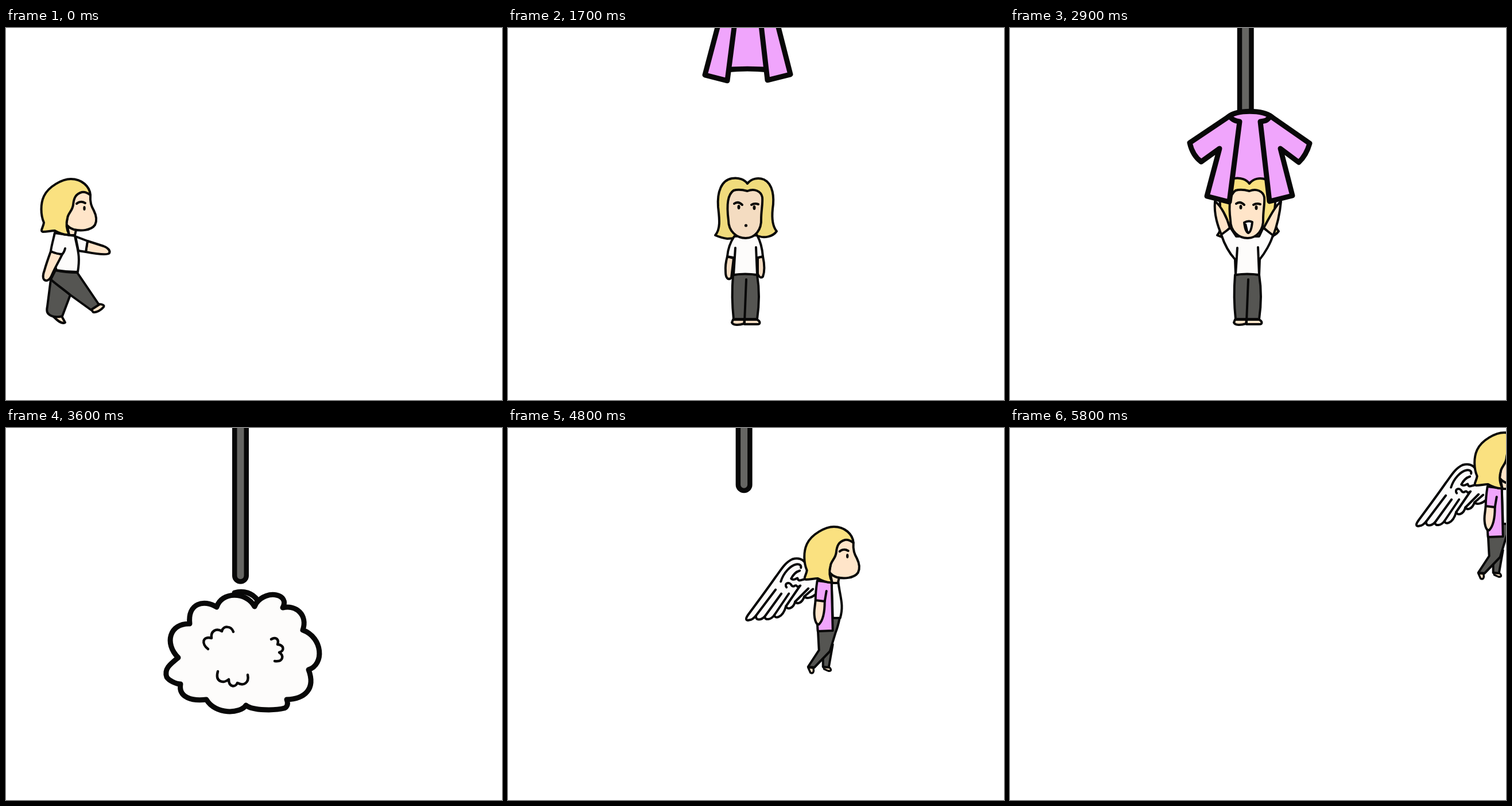
Recreate the animation shown at these times as an HTML page with a canvas. Size 864 px wide and 648 px high, loop 5900 ms.

```html
<!DOCTYPE html>
<html lang="en">
<head>
<meta charset="utf-8">
<title>New coat</title>
<style>
html, body { margin: 0; height: 100%; overflow: hidden; background: #fff; }
canvas { display: block; }
</style>
</head>
<body>
<canvas id="stage" width="864" height="648"></canvas>
<script>
const ctx = document.getElementById('stage').getContext('2d');
const INK = '#080808', WHITE = '#fdfcfb', PANTS = '#555552', PINK = '#f0a5fc';
let skin, hair;

function draw(d, fill, width = 4) {
  const path = new Path2D(d);
  if (fill) { ctx.fillStyle = fill; ctx.fill(path); }
  if (width) { ctx.lineWidth = width; ctx.stroke(path); }
}

function dot(x, y, rx, ry) {
  ctx.fillStyle = INK;
  ctx.beginPath();
  ctx.ellipse(x, y, rx, ry, 0, 0, 7);
  ctx.fill();
}

function at(x, y, part) {
  ctx.save();
  ctx.translate(x, y);
  part();
  ctx.restore();
}

function tone(dim) {
  skin = dim ? '#f4dcc1' : '#ffe5c9';
  hair = dim ? '#f0db7c' : '#fae180';
}

// Straight line through [time, value] pairs
function track(t, keys) {
  for (let i = 1; i < keys.length; i++) {
    const [a, u] = keys[i - 1], [b, v] = keys[i];
    if (t <= b) return u + (v - u) * (t - a) / (b - a);
  }
  return keys[keys.length - 1][1];
}

function sideHead() {
  draw('M107 346L122 352L120 361L110 361Z', skin);
  draw('M147 291C146 304 149 311 153 318C158 328 158 337 155 343C148 353 130 354 118 351C112 349 108 346 105 342L112 300L132 280', skin);
  draw('M64 355C59 353 65 347 66 339C60 325 60 306 66 293C74 276 98 263 113 263C132 263 146 276 147 291C142 287 138 285 132 286C121 289 118 297 117 308C116 318 108 323 107 331C104 342 106 352 110 360C100 361 92 357 85 353C78 353 72 355 64 355Z', hair);
  draw('M123 306C127 302 133 302 138 305');
  dot(136.5, 314, 2.2, 4);
}

function stride(armForward) {
  draw('M83 503L97 502L103 513C98 516 92 512 83 503Z', skin);
  draw('M148 490L162 481C168 481 172 483 170 486C166 491 158 496 152 495Z', skin);
  draw('M78 438L112 465L98 502C90 504 82 503 78 501C72 498 70 494 72 485Z', PANTS);
  draw('M86 422C100 425 112 426 124 426L162 482L148 491L112 465C100 455 88 447 78 438Z', PANTS);
  if (!armForward) {
    draw('M142 371L170 380C178 383 182 388 180 392C177 396 160 394 139 390Z', skin);
    draw('M121 363L142 371L139 390L126 388Z', WHITE);
  }
  draw('M85 357L112 361L120 362C124 385 130 395 125 425C112 425 100 424 88 422C84 410 80 400 80 389Z', WHITE);
  if (armForward) {
    draw('M126 377L180 383C192 385 196 390 192 394C180 399 150 398 122 394Z', skin);
    draw('M93 372C105 370 118 373 128 377L122 394C112 394 102 394 96 392', WHITE);
  } else {
    draw('M78 389C85 392 93 394 98 394C93 405 85 418 80 430C76 440 70 442 66 438C64 435 64 430 67 422C70 411 74 400 78 389Z', skin);
    draw('M85 357C82 370 79 380 78 389C85 392 93 394 98 394C101 391 102 388 103 384', WHITE);
  }
  sideHead();
}

function sideArm() {
  draw('M81 391L97 393C97 408 95 425 87 433C81 435 78 420 79 408Z', skin);
}

function stand() {
  draw('M86 508L102 506C108 508 107 515 102 516C95 517 90 517 86 514Z', skin);
  draw('M92 426L124 426C118 455 110 482 102 507L86 507L85 430Z', PANTS);
  draw('M84 357L120 360C122 385 132 395 123 426Q108 427 92 426L81 391C81 380 82 370 84 357Z', WHITE);
  sideArm();
  draw('M100 375L97 394');
  sideHead();
}

function wing() {
  draw('M538 288C530 296 520 299 516 294C512 306 503 308 500 303C497 315 486 318 484 311C478 333 463 333 464 326C458 335 447 336 447 329C440 336 430 336 432 327C428 332 424 335 420 335C414 337 413 333 418 326C432 307 450 283 466 260C475 248 482 235 495 229C505 226 515 228 520 240', WHITE);
  draw('M466 282L432 327M476 289L447 329M489 289L464 326M508 276L484 311M523 280L500 303M531 281L516 294', null);
  draw('M475 268C480 252 492 240 502 238C508 237 511 240 510 244M508 249C501 251 496 257 493 263C498 267 502 262 504 262C506 269 510 265 516 264', null);
  draw('M485 278C480 271 490 267 494 275C497 279 500 273 502 275C504 278 507 277 509 275', null);
}

function angel(flap) {
  at(70.5, 355.5, () => {
    ctx.rotate(flap);
    at(-525, -265, wing);
  });
  draw('M95 508L104 507C110 512 108 515 103 514L96 511Z', skin, 3.5);
  draw('M68 508L77 509C79 516 76 520 72 517Z', skin, 3.5);
  draw('M111 468L104 508L94 507L94 490Z', PANTS);
  draw('M85 440L111 422L123 422C121 432 118 442 116 447L106 480L79 508L68 507L87 478Z', PANTS);
  draw('M109 360L120 354C123 385 131 397 124 422L111 422Z', WHITE);
  draw('M84 357L109 360L111 444L85 445L81 390C81 380 82 370 84 357Z', PINK);
  sideArm();
  draw('M100 375L97 393');
  sideHead();
}

function front(cheer, dressed) {
  draw('M361 361C371 350 368 330 366 312C364 285 372 265 390 262C402 260 412 264 417 271C424 262 436 260 446 264C462 272 464 295 461 315C459 335 462 347 468 354C461 364 446 366 438 363L382 367C374 366 368 364 361 361Z', hair);
  draw('M392 508L412 508L411 515C402 518 392 518 390 513Z', skin);
  draw('M412 508L434 508C440 511 440 516 434 516L412 516Z', skin);
  draw('M393 430C405 427 422 428 434 430C438 455 438 480 434 507L393 507C390 480 390 455 392 430Z', PANTS);
  draw('M415 438L412 512');
  if (cheer) {
    draw('M357 302C355 325 362 345 369 362L383 348C378 330 368 310 357 302Z', skin);
    draw('M472 302C470 325 465 345 458 363L442 348C452 330 462 310 472 302Z', skin);
    draw('M392 403C380 390 372 372 368 360L384 348L394 363H434L441 348L458 361C454 375 444 392 435 403L434 430Q413 427 393 430Z', WHITE);
  } else {
    draw('M382 398L393 401L389 435C384 440 379 436 379 425C378 412 380 405 382 398Z', skin);
    draw('M435 400L444 398C447 412 447 425 444 433C440 437 436 432 435 428Z', skin);
    draw('M394 363C388 372 383 385 382 398L393 400V430Q413 427 434 430L435 400L444 398C443 385 440 372 434 361Z', WHITE);
  }
  draw('M396 383L393 430M432 382L434 430');
  if (dressed) {
    draw('M394 363C388 372 383 385 382 398L393 400L390 450L406 452L404 364Z', PINK);
    draw('M434 361C440 372 443 385 444 398L435 400L438 450L422 452L424 364Z', PINK);
  }
  draw('M384 335C381 312 382 290 393 283C402 280 410 282 417 284C429 279 441 284 443 295C444 306 441 318 441 332C442 352 430 366 414 366C398 366 384 354 384 335Z', skin);
  draw('M394 306C398 303 403 303 408 308M424 308C429 305 433 306 436 307');
  dot(402, 312, 2.5, 4);
  dot(429, 313, 2.5, 4);
  if (cheer || dressed) {
    draw('M408 339C413 336 418 336 422 338C421 348 419 356 415 357C410 354 409 346 408 339Z', WHITE);
    draw('M411 342L414 355', null, 2.5);
  } else {
    dot(414.5, 344, 2.6, 2.6);
  }
}

function pole(end) {
  const x = 413 - end / 60;
  const line = `M${x} -30V${end - 14}`;
  draw(line, null, 29);
  ctx.strokeStyle = '#666663';
  draw(line, null, 12);
  ctx.strokeStyle = INK;
}

function coatBack() {
  draw('M380 155C395 142 440 142 456 155L452 284C432 282 402 282 382 284Z', PINK, 9);
}

function coatFront(sleeves) {
  const left = sleeves ? 'L313 200Q318 222 333 233' : '';
  const right = sleeves ? 'L522 201Q516 222 503 234' : '';
  draw(`M383 153${left}L365 210L343 293L382 303L400 163C392 162 386 160 383 153Z`, PINK, 9);
  draw(`M453 153${right}L471 210L492 292L452 302L436 163C446 162 450 160 453 153Z`, PINK, 9);
}

function cloud() {
  draw('M433 311C418 284 375 285 367 312C345 298 316 305 320 341C285 340 275 375 300 400C285 412 275 420 280 434C284 440 296 446 304 446C300 470 325 476 349 473C365 500 408 498 418 483C430 493 470 492 485 488C490 486 492 480 489 473C520 472 540 455 527 421C555 412 552 365 517 352C526 325 505 308 482 313C495 290 455 280 436 305Z', WHITE, 9);
  draw('M398 287C414 282 430 288 438 300', null, 9);
  draw('M352 385C340 376 342 362 358 366C356 354 366 348 376 354C378 344 392 344 396 355', null, 4.5);
  draw('M462 368C470 363 476 368 473 377C484 378 486 388 476 391C484 395 484 408 468 406', null, 4.5);
  draw('M369 424C364 442 378 446 388 438C388 452 400 452 403 444C414 450 424 444 421 430', null, 4.5);
}

const WALK_END = 13, CHEER = 24, PUFF = 33, REVEAL = 39, FLY = 42;
const RISE = [[42, 0], [44, 35], [45, 60], [48, -91], [50, -143], [56, -229], [58, -255]];

function scene(n) {
  tone(n < WALK_END ? n % 2 : n < CHEER);
  if (n < WALK_END) {
    at(23.3 * n, 0, () => n % 2 ? stand() : stride(n % 4 === 2));
    return;
  }
  const drop = 17.6 * (Math.min(n, 36) - 29);
  const tuck = n < PUFF ? 18 : 0; // pole end hides behind the coat
  pole(148 + tuck + drop - 17.6 * Math.max(0, n - REVEAL));
  if (n < PUFF) {
    at(0, drop, coatBack);
    front(n >= CHEER);
    at(0, drop, () => coatFront(n > 17));
  } else if (n < REVEAL) {
    const size = track(n, [[33, .6], [36, 1]]);
    at(412, 390, () => {
      ctx.scale(size, size);
      at(-412, -390, cloud);
    });
  } else if (n < FLY) {
    front(false, true);
  } else {
    at(454.7 + 29.3 * (n - 48), track(n, RISE), () => angel(n % 2 * .22));
  }
}

function frame() {
  ctx.fillStyle = '#fff';
  ctx.fillRect(0, 0, 864, 648);
  ctx.strokeStyle = INK;
  ctx.lineCap = ctx.lineJoin = 'round';
  scene(Math.floor(performance.now() % 5900 / 100));
  requestAnimationFrame(frame);
}
frame();
</script>
</body>
</html>
```
